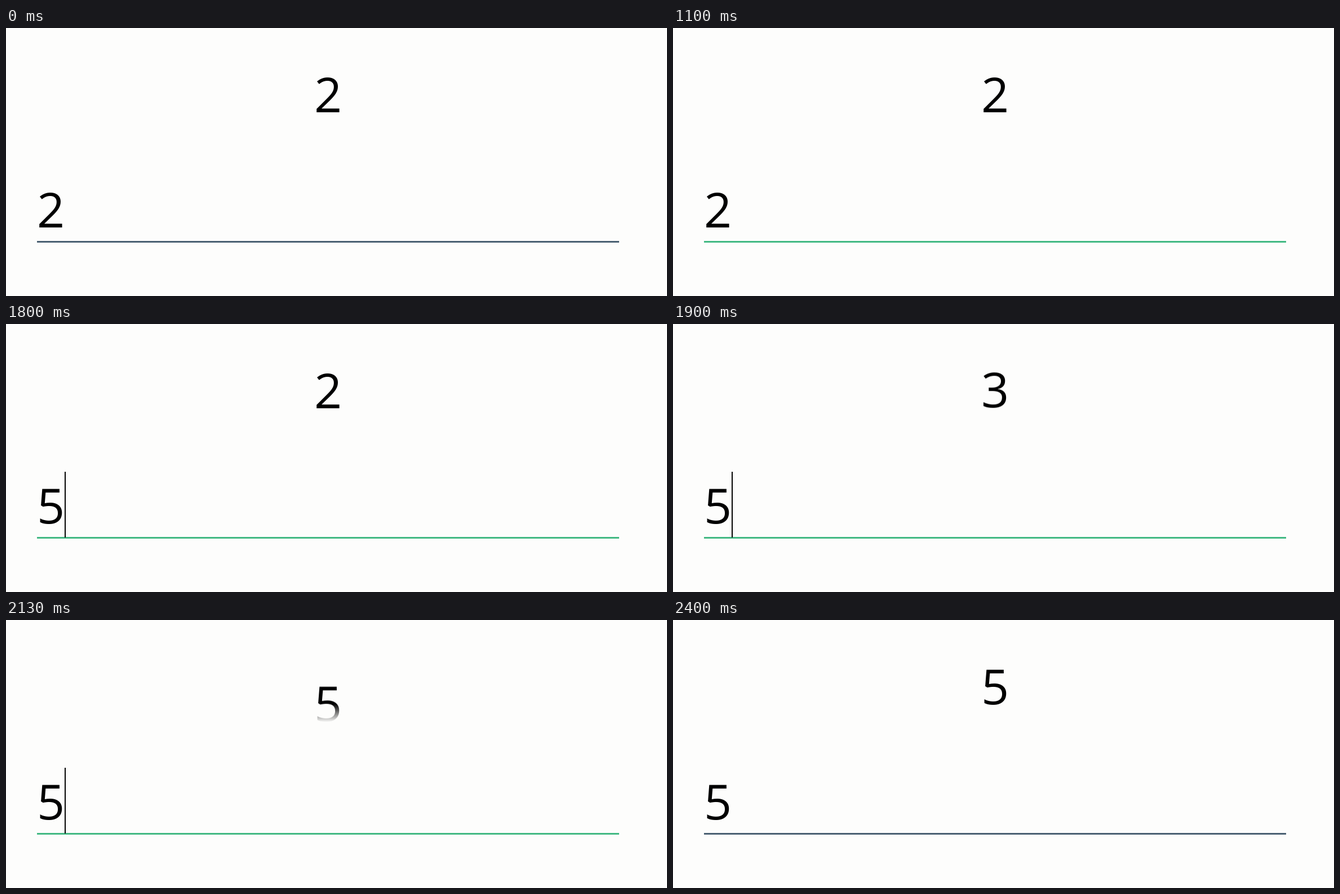
Write an HTML page that moves like this. It is 1173x477 px and loops after 3430 ms.

```html
<!DOCTYPE html>
<html lang="en">
<head>
<meta charset="utf-8">
<title>Rolling number</title>
<style>
  html, body { margin: 0; width: 100%; height: 100%; overflow: hidden; background: #fdfdfc; }
  body { position: relative; font: 86px "Open Sans", "Noto Sans", sans-serif; color: #000; }
  body div { position: absolute; }
  #window {
    left: 546.5px; top: 51.5px; width: 50px; height: 130px; overflow: hidden;
    -webkit-mask-image: linear-gradient(transparent, #000 25%, #000 75%, transparent);
    mask-image: linear-gradient(transparent, #000 25%, #000 75%, transparent);
  }
  #reel { left: 0; top: 0; will-change: transform; }
  #reel span { display: block; height: 130px; line-height: 129px; }
  #value { left: 55px; top: 263px; width: 48.7px; height: 117px; line-height: 117px; }
  #value.selected { background: #338fff; color: #fff; }
  #line { left: 55px; top: 379.2px; width: 1033px; height: 2.6px; }
  #caret { left: 104px; top: 263px; width: 2.2px; height: 117px; background: #000; }
</style>
</head>
<body>
<div id="window"><div id="reel"><span>2</span><span>3</span><span>4</span><span>5</span></div></div>
<div id="value">2</div>
<div id="line"></div>
<div id="caret"></div>
<script>
const LOOP = 3430, PITCH = 130, ROWS = 3;
const FOCUS = 330, SELECT = 1330, TYPED = 1800, SETTLED = 2267, BLUR = 2400;
const ROLL_START = 1785, ROLL_TIME = 526, STEP = 100 / 3;
const [reel, value, line, caret] = ["reel", "value", "line", "caret"].map(id => document.getElementById(id));

const within = (t, from, to) => t >= from && t < to;

// cubic-bezier(.25, .1, .25, 1), solved for x by bisection
function ease(x) {
  let lo = 0, hi = 1;
  for (let i = 0; i < 24; i++) {
    const s = (lo + hi) / 2;
    if (0.75 * s * (1 - s) + s ** 3 < x) lo = s; else hi = s;
  }
  return 0.3 * lo * (1 - lo) ** 2 + 3 * lo * lo * (1 - lo) + lo ** 3;
}

function rollProgress(t) {
  // the reel advances about thirty times a second
  const n = Math.floor((t - TYPED + 4) / STEP);
  const shown = TYPED + n * STEP;
  if (n < 1) return 0;
  if (shown >= SETTLED - 1) return 1;
  return ease((shown - ROLL_START) / ROLL_TIME);
}

function draw(t) {
  reel.style.transform = `translateY(${-PITCH * ROWS * rollProgress(t)}px)`;
  value.textContent = t < TYPED ? "2" : "5";
  value.className = within(t, SELECT, TYPED) ? "selected" : "";
  line.style.background = within(t, FOCUS, BLUR) ? "#42b983" : "#4a6072";
  const caretOn = within(t, 570, 1100) || within(t, TYPED, 2330);
  caret.style.visibility = caretOn ? "visible" : "hidden";
}

const start = performance.now();
function tick() {
  draw((performance.now() - start) % LOOP);
  requestAnimationFrame(tick);
}
draw(0);
requestAnimationFrame(tick);
</script>
</body>
</html>
```
